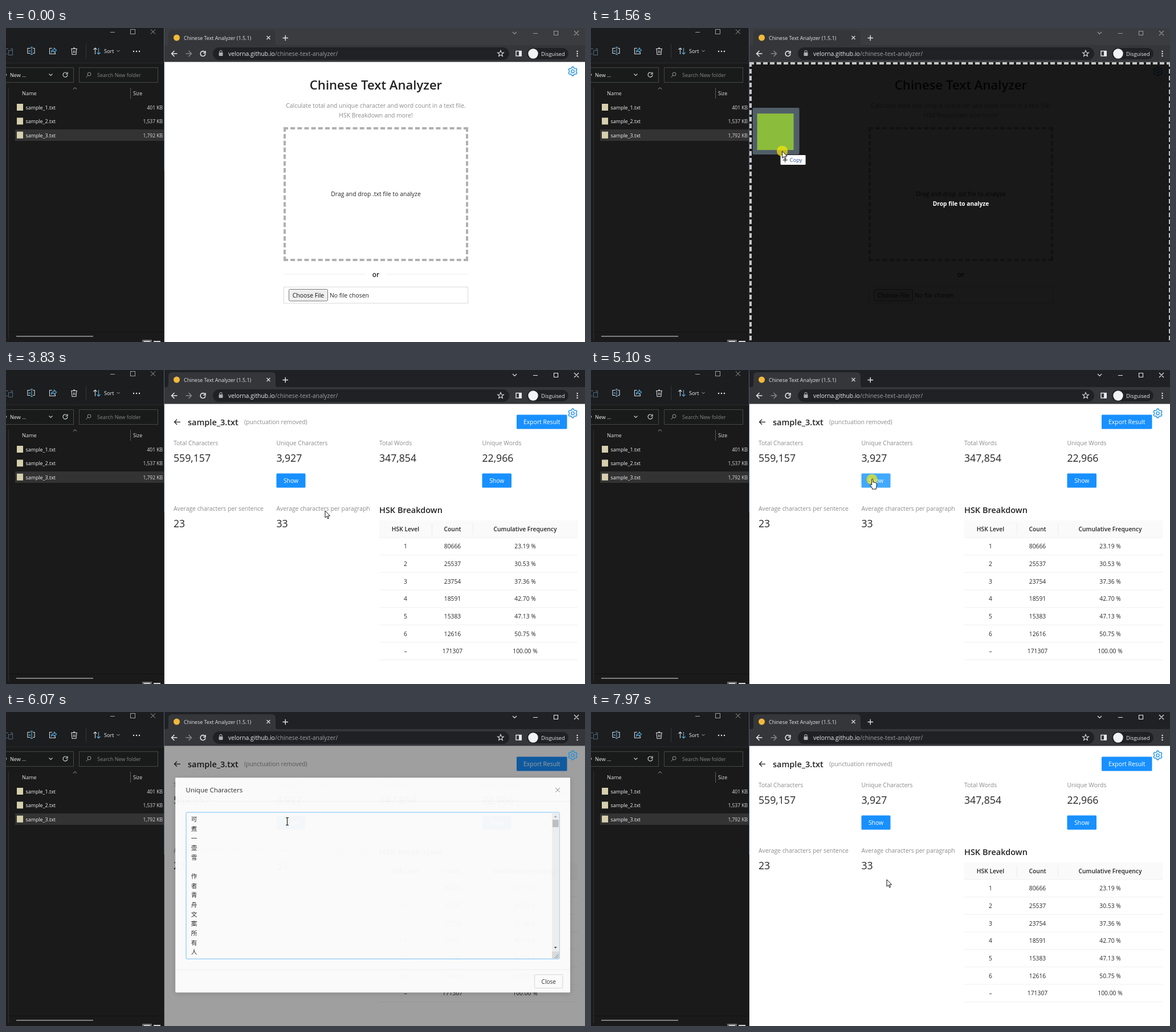
An HTML page that plays this animation: 1016x551 px, repeating every 8 s.

```html
<!DOCTYPE html>
<html lang="en">
<head>
<meta charset="utf-8">
<title>Text analyzer demo</title>
<style>
  html, body { margin: 0; width: 100%; height: 100%; overflow: hidden; background: #191a19; }
  svg { display: block; width: 1016px; height: 551px; }
  text { font-family: "Open Sans", "Noto Sans CJK SC", "Noto Sans CJK", "Noto Sans", sans-serif; white-space: pre; }
</style>
</head>
<body>
<svg id="stage" viewBox="0 0 1016 551"></svg>
<script>
const LOOP = 8000;
const BLUE = '#1890ff', HOVER = '#40a9ff', GRAY = '#8c8c8c', INK = '#262626';
const stage = document.getElementById('stage');

// ---- drawing helpers ----
function add(parent, tag, attrs = {}, content) {
  const el = document.createElementNS('http://www.w3.org/2000/svg', tag);
  for (const k in attrs) el.setAttribute(k, attrs[k]);
  if (content !== undefined) el.textContent = content;
  parent.appendChild(el);
  return el;
}
const group = (parent = stage) => add(parent, 'g');
const rect = (p, x, y, width, height, fill, more = {}) =>
  add(p, 'rect', { x, y, width, height, fill, ...more });
const line = (p, d, stroke, width = 1, more = {}) =>
  add(p, 'path', { d, stroke, 'stroke-width': width, fill: 'none', ...more });
const text = (p, x, y, str, size, fill, weight = 400, anchor = 'start') =>
  add(p, 'text', { x, y, 'font-size': size, fill, 'font-weight': weight, 'text-anchor': anchor }, str);
const dot = (p, cx, cy, r, fill) => add(p, 'circle', { cx, cy, r, fill });
const cross = (p, x, y, r, color, width = 1) =>
  line(p, `M${x - r} ${y - r}l${2 * r} ${2 * r}m0 ${-2 * r}l${-2 * r} ${2 * r}`, color, width);
const dots = (p, x, y, dx, dy, r, color) => {
  for (const i of [-1, 0, 1]) dot(p, x + i * dx, y + i * dy, r, color);
};
const show = (el, on) => el.setAttribute('visibility', on ? 'visible' : 'hidden');

function dashBox(p, x, y, w, h, color) {
  const b = 4, dash = 8;
  const side = (d, len) => {
    const n = Math.round((len + b) / (dash + b));
    line(p, d, color, b, { 'stroke-dasharray': `${dash} ${(len - n * dash) / (n - 1)}` });
  };
  side(`M${x} ${y + 2}h${w}`, w);
  side(`M${x} ${y + h - 2}h${w}`, w);
  side(`M${x + 2} ${y}v${h}`, h);
  side(`M${x + w - 2} ${y}v${h}`, h);
}

function refreshIcon(p, x, y, r, color, width) {
  line(p, `M${x + r * .8} ${y - r * .6}A${r} ${r} 0 1 0 ${x + r} ${y + .6}`, color, width);
  line(p, `M${x + r} ${y - r - .4}v${r * .85}h${-r * .85}`, color, width);
}

// ---- file explorer ----
const explorer = group();
rect(explorer, 0, 0, 278, 551, '#191a19');
rect(explorer, 0, 0, 278, 61, '#1c1d1f');
line(explorer, 'M0 61.5H278', '#2a2b2c');
const LIGHT = '#d8d8d8', SKY = '#58aee0';
line(explorer, 'M183 7.5h8', '#a0a0a0');
rect(explorer, 218.5, 2.5, 8, 8, 'none', { stroke: '#a0a0a0' });
cross(explorer, 258, 6.5, 4, '#a0a0a0');

line(explorer, 'M0 36.5h4m4 0h3v3M0 45.500h3', '#5c6670', 1.2);
rect(explorer, 4.5, 39.5, 7, 8, 'none', { stroke: '#4a6880' });
line(explorer, 'M43 35.500h-5v9h5m4 -9h3v9h-3', LIGHT, 1.1);
line(explorer, 'M43 33.500h4m-2 0v13m-2 0h4', SKY, 1.1);
line(explorer, 'M40 40.500h3', SKY, 1.5);
line(explorer, 'M81 35.500h-4.500v10h10v-3', LIGHT, 1.1);
line(explorer, 'M79.500 42.500q.5 -5 5 -5v-2.500l4 4l-4 4v-2.500q-3 -.5 -5 2z', SKY, 1.1);
line(explorer, 'M114 36.500h11m-7 0q1.500 -4 3 0m-6 0l1 10h7l1 -10m-5.500 3v4.500m2.500 -4.500v4.500', LIGHT, 1.1);
line(explorer, 'M140.500 28v25', '#343536');
line(explorer, 'M156.500 46v-11m-3 3l3 -3l3 3', LIGHT, 1.1);
line(explorer, 'M162.500 35v11m-3 -3l3 3l3 -3', SKY, 1.1);
text(explorer, 172, 44, 'Sort', 9.2, '#f0f0f0');
line(explorer, 'M194.500 39l2.500 2.500l2.500 -2.500', '#aaa');
dots(explorer, 229, 41, 5, 0, 1.2, '#eee');

rect(explorer, -5.5, 69.5, 124, 26, '#191a1a', { stroke: '#464747' });
line(explorer, 'M-1 79l2 3l-2 3', '#ccc');
text(explorer, 7, 86, 'New ...', 9, '#f0f0f0');
line(explorer, 'M75.500 80.500l3 3l3 -3', '#ccc', 1.1);
refreshIcon(explorer, 104, 82, 4, '#ddd', 1.1);
rect(explorer, 128.5, 69.5, 138, 26, '#191a1a', { stroke: '#464747' });
add(explorer, 'circle', { cx: 146, cy: 81, r: 3, fill: 'none', stroke: '#999' });
line(explorer, 'M144 83l-3.500 3.500', '#999');
text(explorer, 160, 86, 'Search New folder', 9, '#858585');

line(explorer, 'M4.500 104V546', '#303130');
line(explorer, 'M118 107.500l3 -3l3 3', '#aaa');
text(explorer, 28, 118, 'Name', 9.2, '#e4e4e4');
line(explorer, 'M218.500 105v19', '#5a5a5a');
text(explorer, 223, 118, 'Size', 8.8, '#e4e4e4');
rect(explorer, 16, 178, 261, 20, '#333');
const rowHover = rect(explorer, 16, 178, 261, 20, '#fff', { opacity: .07 });
['401 KB', '1,537 KB', '1,792 KB'].forEach((size, i) => {
  const y = 139 + i * 24.4;
  rect(explorer, 19, y - 6, 11, 12, '#d6cfae');
  text(explorer, 34.5, y + 3.7, `sample_${i + 1}.txt`, 8.9, '#f2f2f2');
  text(explorer, 275, y + 3.7, size, 8.5, '#dcdcdc', 400, 'end');
});
line(explorer, 'M5 533.500H277', '#101110');
line(explorer, 'M18 541H153', '#a0a0a0', 1.6);
rect(explorer, 239, 547, 17, 4, '#6a6a6a');
rect(explorer, 242, 549, 11, 2, '#c8c8c8');
rect(explorer, 259, 549, 12, 2, '#d0d0d0');
line(explorer, 'M277.500 0V250', '#4b6070');
line(explorer, 'M277.500 250V551', '#34383a');

// ---- browser frame ----
const browser = group();
const strip = rect(browser, 278, 0, 738, 31, '#3b3c40');
add(browser, 'path', { d: 'M279 31q6 0 6 -6v-14q0 -7 7 -7h174q7 0 7 7v14q0 6 6 6z', fill: '#35363a' });
rect(browser, 278, 30, 738, 29.5, '#35363a');
dot(browser, 299.5, 17, 5.5, '#f2b93b');
text(browser, 312, 20.5, 'Chinese Text Analyzer (1.5.1)', 8.95, '#e3e5e8');
cross(browser, 460.5, 17, 3, '#d8dadd', 1.3);
line(browser, 'M485.500 17.500h9.500m-4.750 -4.750v9.500', '#e3e5e8', 1.4);
const buttons = group(browser);
buttons.setAttribute('stroke', '#97989b');
line(buttons, 'M889 7l3.500 3.500l3.500 -3.500M925 9.500h8M961.500 5.500h7v7h-7zM997 5l8 8m0 -8l-8 8', 'inherit', 1.1);
line(browser, 'M300.500 45h-10m5 -5l-5 5l5 5', '#e8eaed', 1.5);
line(browser, 'M315.500 45h10m-5 -5l5 5l-5 5', '#85878b', 1.5);
refreshIcon(browser, 345.5, 45, 4.4, '#e8eaed', 1.6);
rect(browser, 363, 34, 520, 22, '#202124', { rx: 11 });
rect(browser, 373.5, 43, 7, 6, '#aab0b5', { rx: 1 });
line(browser, 'M375 43v-1.500a2 2 0 0 1 4 0v1.500', '#aab0b5', 1.1);
const url = text(browser, 390, 48.500, '', 10.4, '#9aa0a6');
add(url, 'tspan', { fill: '#e8eaed' }, 'velorna.github.io');
add(url, 'tspan', {}, '/chinese-text-analyzer/');
const star = Array.from({ length: 10 }, (_, i) => {
  const a = i * Math.PI / 5, r = i % 2 ? 2.4 : 5.6;
  return `${868 + r * Math.sin(a)} ${45 - r * Math.cos(a)}`;
});
line(browser, `M${star.join('L')}Z`, '#dfe1e5', 1.1);
rect(browser, 895, 40.5, 9, 8.5, 'none', { stroke: '#e8eaed', 'stroke-width': 1.4 });
rect(browser, 900, 40, 5, 9.5, '#e8eaed');
rect(browser, 914, 35, 73, 20, '#202124', { rx: 10 });
dot(browser, 925, 45, 8.7, '#f1f3f4');
text(browser, 939, 48.500, 'Disguised', 9.2, '#e8eaed');
dots(browser, 1002.5, 45, 0, 4, 1.2, '#e8eaed');

// ---- page: start ----
rect(stage, 278, 59.5, 738, 491.5, '#fff');
const home = group();
text(home, 649, 108, 'Chinese Text Analyzer', 22.1, '#222', 600, 'middle');
text(home, 649, 139.500, 'Calculate total and unique character and word count in a text file.', 10.4, GRAY, 400, 'middle');
text(home, 649, 157, 'HSK Breakdown and more!', 10.4, GRAY, 400, 'middle');
dashBox(home, 487, 174, 324, 235, '#b0b0b0');
text(home, 649, 295, 'Drag and drop .txt file to analyze', 10.4, INK, 400, 'middle');
line(home, 'M487 432H631M667 432H811', '#ececec');
text(home, 649, 436.500, 'or', 11.9, INK, 600, 'middle');
rect(home, 487.5, 454.5, 323, 28.5, '#fff', { stroke: '#d9d9d9' });
rect(home, 496.5, 458.5, 68, 20.5, '#efefef', { stroke: '#767676', rx: 2 });
text(home, 530.5, 472.500, 'Choose File', 10.4, '#111', 400, 'middle');
text(home, 568, 472.500, 'No file chosen', 10.4, INK);

// ---- page: results ----
const results = group();
function button(p, x, y, w, label) {
  const box = rect(p, x, y, w, 25, BLUE, { rx: 1.5 });
  text(p, x + w / 2, y + 16.3, label, 10.4, '#fff', 400, 'middle');
  return box;
}
function stat(x, y, label, value) {
  text(results, x, y, label, 10.4, GRAY);
  text(results, x, y + 29, value, 17.7, INK);
}
line(results, 'M306 91.300h-10.500m4.500 -4.500l-4.500 4.500l4.500 4.500', '#222', 1.3);
text(results, 319, 97, 'sample_3.txt', 14.5, '#222', 600);
text(results, 418, 95, '(punctuation removed)', 10.4, GRAY);
button(results, 896, 78.5, 88.5, 'Export Result');
stat(294, 132, 'Total Characters', '559,157');
stat(474.5, 132, 'Unique Characters', '3,927');
stat(655, 132, 'Total Words', '347,854');
stat(835.5, 132, 'Unique Words', '22,966');
stat(294, 246.5, 'Average characters per sentence', '23');
stat(474.5, 246.5, 'Average characters per paragraph', '33');
const showButton = button(results, 474.5, 181.5, 51, 'Show');
button(results, 835.5, 181.5, 51.5, 'Show');
text(results, 655, 251, 'HSK Breakdown', 14.5, '#222', 600);

const COLS = [701, 783.5, 911];
const cells = (row, y, weight) =>
  row.forEach((s, i) => text(results, COLS[i], y, s, 10.3, INK, weight, 'middle'));
rect(results, 655, 264, 348.5, 30, '#fafafa');
line(results, 'M747.500 270v19M819.500 270v19', '#ececec');
cells(['HSK Level', 'Count', 'Cumulative Frequency'], 282.500, 600);
line(results, 'M655 294H1003.500', '#f0f0f0');
[['1', '80666', '23.19 %'], ['2', '25537', '30.53 %'], ['3', '23754', '37.36 %'],
 ['4', '18591', '42.70 %'], ['5', '15383', '47.13 %'], ['6', '12616', '50.75 %'],
 ['–', '171307', '100.00 %']].forEach((row, i) => {
  const y = 294 + i * 30.65;
  cells(row, y + 19.3, 400);
  line(results, `M655 ${y + 30.65}H1003.500`, '#f0f0f0');
});

const mask = rect(stage, 278, 59.5, 738, 491.5, '#000');

// ---- settings gear ----
const gear = group();
const teeth = Array.from({ length: 72 }, (_, i) => {
  const a = i * Math.PI / 36, r = 6.9 - Math.max(-.9, Math.min(.9, 1.6 * Math.cos(6 * a)));
  return `${(994.5 + r * Math.cos(a)).toFixed(2)} ${(76 + r * Math.sin(a)).toFixed(2)}`;
});
line(gear, `M${teeth.join('L')}Z`, '#1b90e0', 1.4);
add(gear, 'circle', { cx: 994.5, cy: 76, r: 2.7, fill: 'none', stroke: '#1b90e0', 'stroke-width': 1.3 });

// ---- drop overlay, its frame runs past the stage ----
const overlay = group();
rect(overlay, 278, 59.5, 738, 491.5, '#000', { opacity: .9 });
dashBox(overlay, 278, 60, 740, 500, '#c4c4c4');
text(overlay, 649, 312, 'Drop file to analyze', 10.2, '#fff', 700, 'middle');

// ---- modal ----
const modal = group();
modal.style.filter = 'drop-shadow(0 2px 5px rgba(0,0,0,.15))';
rect(modal, 290.5, 112.7, 716.5, 389.8, '#fff', { rx: 1.5 });
text(modal, 309.5, 139, 'Unique Characters', 11.9, INK, 500);
cross(modal, 984.5, 135, 4, '#777');
line(modal, 'M290.500 155.500H1007M290.500 461H1007', '#f0f0f0');
const area = rect(modal, 310, 175.500, 677.5, 266, '#fff', { stroke: '#d0d0d0', rx: 1.5 });
rect(modal, 974, 176, 13, 252, '#f1f1f1');
rect(modal, 975, 189, 11, 13.5, '#c1c1c1');
add(modal, 'path', { d: 'M977.500 184.500l2.800 -3l2.800 3z', fill: '#a3a3a3' });
add(modal, 'path', { d: 'M977.500 419.500l2.800 3l2.800 -3z', fill: '#505050' });
rect(modal, 974, 428, 13, 13, '#dcdcdc');
line(modal, 'M979 440l7 -7M983 440l3 -3', '#666', .8);
[...'可煮一壶雪 作者青舟文案所有人'].forEach((c, i) =>
  text(modal, 319, 192.3 + i * 17.22, c, 11, INK));
const closeBox = rect(modal, 942.5, 470, 51, 24.5, '#fff', { rx: 1.5 });
const closeText = text(modal, 968, 486.300, 'Close', 10.4, INK, 400, 'middle');

// ---- dragged file and pointer ----
const drag = group();
rect(drag, -52, -76, 82, 82, '#5a6a76', { rx: 2, opacity: .85 });
rect(drag, -44, -66, 64, 64, '#8cbc3c');
const copyTag = group(drag);
rect(copyTag, -3, 7, 44, 17, '#fff', { rx: 1 });
line(copyTag, 'M1 15.500h8m-4 -4v8', '#333', 1.2);
text(copyTag, 13, 19.200, 'Copy', 9.4, '#2a4d8c');

const press = dot(stage, 0, 0, 9.6, 'rgb(255,235,0)');
const outline = { stroke: '#111', 'stroke-width': 1, 'stroke-linejoin': 'round', fill: '#fff' };
const pointers = {
  arrow: add(stage, 'path', { ...outline, d: 'M0 0V12.200L2.800 9.600L4.700 14L6.600 13.200L4.700 9H8.600Z' }),
  hand: add(stage, 'path', { ...outline, d:
    'M-.4 .2C-.4 -1.400 2 -1.400 2 .2V5.200C2.200 4.400 4.200 4.600 4.200 5.600C4.600 4.800 6.400 5.200 6.400 6.200' +
    'C6.800 5.600 8.200 6 8.200 7.200V11.400C8.200 13 7.400 13.600 7.400 15.200V17H.4V15.200C-.4 13.400 -2 12 -3.200 9.800' +
    'C-3.800 8.400 -2.200 7.800 -1.400 8.800L-.4 10Z' }),
  beam: line(stage, 'M-2 -6.500h2l.5 .6l.5 -.6h2M.5 -6v12M-2 6.500h2l.5 -.6l.5 .6h2', '#111', 1.1)
};

// ---- motion ----
const clamp = v => Math.max(0, Math.min(1, v));
const ramp = (t, from, length) => clamp((t - from) / length);
const smooth = v => v * v * (3 - 2 * v);
const mix = (a, b, v) => a + (b - a) * v;
const mixColor = (a, b, v) => `rgb(${a.map((c, i) => Math.round(mix(c, b[i], v)))})`;

function bezier(x1, y1, x2, y2) {
  const at = (a, b, s) => 3 * a * s * (1 - s) ** 2 + 3 * b * s * s * (1 - s) + s ** 3;
  return x => {
    let lo = 0, hi = 1;
    for (let i = 0; i < 24; i++) {
      const mid = (lo + hi) / 2;
      if (at(x1, x2, mid) < x) lo = mid; else hi = mid;
    }
    return at(y1, y2, lo);
  };
}
const zoomIn = bezier(.08, .82, .17, 1);
const zoomOut = bezier(.78, .14, .15, .86);

// time, x, y, easing towards this point
const PATH = [
  [480, 6, 8], [860, 72, 187, smooth], [1240, 72, 187],
  [1560, 335, 216], [1950, 560, 247], [4390, 560, 247],
  [4910, 493, 192, smooth], [6500, 493, 192], [7180, 975, 491, smooth],
  [7440, 975, 491], [7960, 519, 294, smooth], [LOOP, 519, 294]
];
function pointerAt(t) {
  const i = Math.max(1, PATH.findIndex(k => k[0] > t));
  const [t0, x0, y0] = PATH[i - 1], [t1, x1, y1, ease = v => v] = PATH[i];
  const v = ease(ramp(t, t0, t1 - t0));
  return [mix(x0, x1, v), mix(y0, y1, v)];
}
const OPEN = 5920, LEAVE = 7430;

function render(t) {
  const [x, y] = pointerAt(t);
  const inside = (l, top, r, b) => x > l && x < r && y > top && y < b;
  const focused = t >= 2510, dragging = t >= 1240 && t < 2510;
  const modalOn = t >= OPEN && t < LEAVE + 200;
  const place = `translate(${x} ${y})`;

  strip.setAttribute('fill', focused ? '#202124' : '#3b3c40');
  buttons.setAttribute('stroke', focused ? '#e6e7e9' : '#97989b');
  const row = Math.floor((y - 129) / 24.4);
  show(rowHover, t >= 480 && t < 1240 && row >= 0 && row < 3);
  rowHover.setAttribute('y', 129 + clamp(row / 2) * 49);

  show(home, t < 3830);
  show(results, t >= 3830);
  show(overlay, dragging && x > 278);
  show(drag, dragging);
  show(copyTag, dragging && x > 278);
  drag.setAttribute('transform', place);

  const overShow = t >= 3830 && !modalOn && inside(474, 181, 526, 207);
  const overArea = modalOn && inside(310, 175, 974, 442);
  const overClose = modalOn && inside(942, 470, 994, 495);
  showButton.setAttribute('fill', overShow ? HOVER : BLUE);

  // the dialog grows from, and shrinks back to, the clicked button
  const leaving = t >= LEAVE;
  const zoom = leaving ? 1 - zoomOut(ramp(t, LEAVE, 200)) : zoomIn(ramp(t, OPEN, 300));
  const fade = leaving ? 1 - ramp(t, LEAVE, 200) : ramp(t, OPEN, 180);
  show(modal, modalOn);
  modal.setAttribute('opacity', zoom);
  modal.setAttribute('transform', `translate(492 192) scale(${mix(.2, 1, zoom)}) translate(-492 -192)`);
  mask.setAttribute('opacity', .45 * fade);
  area.setAttribute('stroke', overArea ? '#6fbfff' : '#d0d0d0');
  const warm = ramp(t, 7080, 230);
  closeBox.setAttribute('stroke', mixColor([217, 217, 217], [64, 169, 255], warm));
  closeText.setAttribute('fill', mixColor([45, 45, 45], [64, 169, 255], warm));

  const glow = t < 2510 ? +(t >= 860)
    : t < 7000 ? (t >= 5100 ? 1 - ramp(t, 5200, 160) : 0)
    : t >= 7380 ? 1 - ramp(t, 7440, 100) : 0;
  press.setAttribute('opacity', .66 * glow);
  press.setAttribute('transform', place);

  const kind = overShow || overClose ? 'hand' : overArea ? 'beam' : 'arrow';
  for (const k in pointers) {
    show(pointers[k], t >= 480 && k === kind);
    pointers[k].setAttribute('transform', place);
  }
}

const start = performance.now();
function tick() {
  render((performance.now() - start) % LOOP);
  requestAnimationFrame(tick);
}
tick();
</script>
</body>
</html>
```
